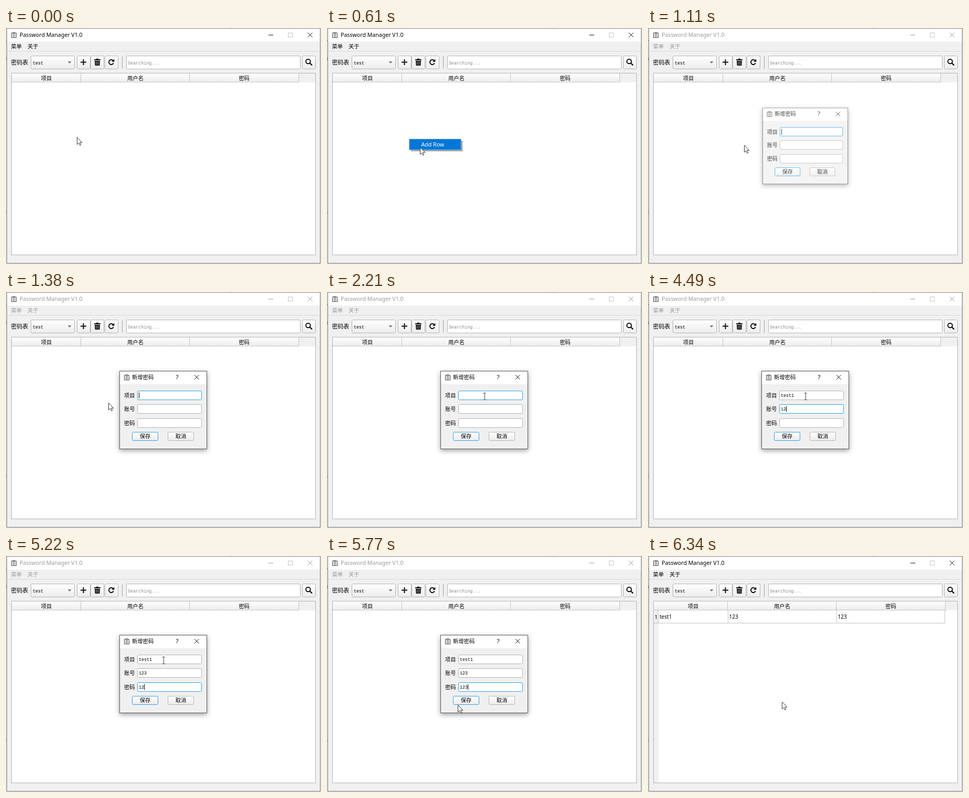
Write an HTML page that moves like this. It is 600 px wide and 452 px high and loops after 7.13 s.

```html
<!DOCTYPE html>
<html lang="zh">
<head>
<meta charset="utf-8">
<title>Password Manager</title>
<style>
html, body { margin: 0; width: 100%; height: 100%; overflow: hidden; background: #e4e4e4; }
svg { display: block; }
text { font: 10.3px "Noto Sans", "Noto Sans CJK SC", "Noto Sans CJK", sans-serif; fill: #000; white-space: pre; }
.mid { text-anchor: middle; }
.title { font-size: 10.6px; }
.mono { font: 8.4px "Liberation Mono", monospace; }
.box { fill: #fff; stroke: #b4b4b4; }
.btn { fill: url(#face); stroke: #b4b4b4; }
.focus { stroke: #30a0ea; }
.pressed { fill: #d6dde3; }
.line { fill: none; stroke: #c3c3c3; }
.ink { fill: none; stroke: #111; }
.inactive text { fill: #9a9a9a; }
.inactive .ink { stroke: #999; }
</style>
</head>
<body>
<svg width="600" height="452" viewBox="0 0 600 452">
  <defs>
    <linearGradient id="face" x2="0" y2="1">
      <stop stop-color="#fff"/><stop offset="1" stop-color="#ececec"/>
    </linearGradient>
    <filter id="shadow" x="-20%" y="-20%" width="140%" height="145%">
      <feDropShadow dx="0" dy="3" stdDeviation="5" flood-opacity=".38"/>
    </filter>
    <g id="clip" fill="none" stroke="#444">
      <path d="M2.5 1.5H.5v9h9v-9h-2M3 .5h4v2H3z"/>
      <path d="M2.5 4.5h5M2.5 6.5h5M2.5 8.5h5" stroke-width=".8"/>
    </g>
    <path id="cross" d="M0 0l8.5 8.5M8.5 0L0 8.5"/>
  </defs>

  <rect x="1.5" y=".5" width="597" height="450" fill="#f0f0f0" stroke="#7c7c7c"/>
  <path d="M0 24.5h1M0 56v6M0 353.5h1M428 .5h2" stroke="#555"/>
  <rect x="2" y="1" width="596" height="25" fill="#fff"/>
  <path d="M2 44.5h596" stroke="#d9d9d9"/>
  <use href="#clip" x="10" y="8"/>
  <g id="chrome">
    <text class="title" x="26" y="17">Password Manager V1.0</text>
    <text x="9.5" y="39">菜单</text>
    <text x="41" y="39">关于</text>
    <path class="ink" d="M500 13.5h9"/>
    <path d="M537.5 9.5h8v8h-8z" class="line"/>
    <use href="#cross" class="ink" x="575" y="9"/>
  </g>

  <text x="9.5" y="70" style="font-size:10.9px">密码表</text>
  <rect class="btn" x="47.5" y="53.5" width="83" height="25" rx="2"/>
  <text class="mono" x="51" y="69.5">test</text>
  <path d="M117.5 64h7l-3.5 4z" fill="#777"/>
  <g class="btn">
    <rect x="135.5" y="53.5" width="25" height="25" rx="2"/>
    <rect x="161.5" y="53.5" width="25" height="25" rx="2"/>
    <rect x="188.5" y="53.5" width="25" height="25" rx="2"/>
    <rect x="564.5" y="53.5" width="25" height="25" rx="2"/>
  </g>
  <g fill="none" stroke="#111" stroke-width="2">
    <path d="M142 65.5h11M147.5 60v11"/>
    <path d="M204 62.3A4.6 4.6 0 1 0 204.8 67.2"/>
    <circle cx="575.5" cy="64" r="4.3"/>
    <path d="M578.5 67l4.5 4.5" stroke-width="2.4"/>
  </g>
  <path d="M206.3 59.3v5.4h-5.4zM168 60h3.5l1-1.5h3l1 1.5h3.5v2h-12zM169 63h10l-.6 9h-8.8z" fill="#111"/>
  <path d="M171.7 64.5v6M174 64.5v6M176.3 64.5v6" stroke="#bbb" stroke-width=".8"/>
  <path d="M221.5 54v24" stroke="#a0a0a0"/>
  <rect class="box" x="229.5" y="53.5" width="331" height="25" rx="2"/>
  <text class="mono" x="232" y="69.5" style="fill:#888">Searching...</text>

  <rect class="box" x="10.5" y="86.5" width="579" height="348"/>
  <rect x="11" y="87" width="578" height="17" fill="#f0f0f0"/>
  <rect id="header" x="11" y="87" height="17" fill="url(#face)"/>
  <path id="rule" class="line"/>
  <g id="cols">
    <path class="line" d="M142.5 87v17M349.5 87v17M557.5 87v17"/>
    <text class="mid" x="77" y="99.5">项目</text>
    <text class="mid" x="246.5" y="99.5">用户名</text>
    <text class="mid" x="453.5" y="99.5">密码</text>
  </g>
  <g id="row">
    <rect x="11" y="104" width="9" height="330" fill="#f0f0f0"/>
    <path class="line" d="M11 128.5h555M19.5 104v24M152.5 104v24M359.5 104v24M565.5 104v24"/>
    <g style="font-size:10px">
      <text x="12.5" y="120.5">1</text>
      <text x="22" y="120" style="font-size:10px">test1</text>
      <text x="154.5" y="120" style="font-size:10px">123</text>
      <text x="361.5" y="120" style="font-size:10px">123</text>
    </g>
  </g>

  <g id="menu">
    <path d="M160 234h96v-18h2v20h-98z" fill="#000" opacity=".42"/>
    <rect id="item" x="156.5" y="212.5" width="99" height="21" stroke="#a9cbe6"/>
    <text id="label" class="title" x="179.5" y="227">Add Row</text>
  </g>

  <g id="dialog">
    <rect x="216.5" y="151.5" width="166" height="149" fill="#f0f0f0" stroke="#5c5c5c" filter="url(#shadow)"/>
    <rect x="217" y="152" width="165" height="24.5" fill="#fff"/>
    <use href="#clip" x="225" y="158"/>
    <text x="240" y="167">新增密码</text>
    <text class="mid" x="326" y="167" style="font-size:11.5px;font-weight:500">?</text>
    <use href="#cross" class="ink" x="359" y="159"/>
    <g id="fields"></g>
    <path id="caret" stroke="#000"/>
    <rect id="save" class="btn focus" x="240.5" y="268.5" width="49" height="16" rx="2"/>
    <text class="mid" x="265" y="280">保存</text>
    <rect class="btn" x="308.5" y="268.5" width="49" height="16" rx="2"/>
    <text class="mid" x="333" y="280">取消</text>
  </g>

  <path id="arrow" d="M.5 .5V14L3.6 11.2 5.8 15.8 7.8 14.9 5.7 10.4H9.8z" fill="#fff" stroke="#222" stroke-width=".9"/>
  <path id="beam" d="M-2.5 -6.5H2.5M.5 -6.5V6.5M-2.5 6.5H2.5" fill="none" stroke="#444"/>
</svg>
<script>
const LOOP = 7130, OPEN = 1030, CLOSE = 5980;
const $ = id => document.getElementById(id);
const clamp = v => Math.max(0, Math.min(1, v));
const show = (id, on) => $(id).style.display = on ? '' : 'none';

// Each field: top edge, time it gains focus, and the time of every keystroke.
const fields = [
  { label: '项目', y: 189, focus: 0, text: 'test1', keys: [2740, 3000, 3150, 3220, 3480] },
  { label: '账号', y: 215, focus: 3750, text: '123', keys: [4160, 4490, 4690] },
  { label: '密码', y: 242, focus: 4890, text: '123', keys: [5220, 5220, 5420] }
];
$('fields').innerHTML = fields.map(f => `
  <text x="225" y="${f.y + 13}">${f.label}</text>
  <rect class="box" x="250.5" y="${f.y + .5}" width="122" height="17" rx="2"/>
  <text class="mono" x="253" y="${f.y + 12}"></text>`).join('');
const boxes = $('fields').querySelectorAll('rect');
const values = $('fields').querySelectorAll('.mono');

// Pointer path: time, x, y
const path = [
  [130, 135, 209], [340, 156, 212], [470, 156, 212], [610, 177, 228], [680, 177, 228],
  [820, 180, 227], [1030, 180, 227], [1380, 195, 212], [1450, 195, 212], [1660, 256, 211],
  [2210, 300, 200], [5350, 300, 200], [5770, 249, 285], [5980, 249, 285], [6340, 255, 279]
];

function pointer(t) {
  const i = path.findIndex(p => p[0] > t);
  if (i < 0) return path[path.length - 1].slice(1);
  if (!i) return path[0].slice(1);
  const [t0, x0, y0] = path[i - 1], [t1, x1, y1] = path[i];
  const k = (t - t0) / (t1 - t0);
  return [x0 + (x1 - x0) * k, y0 + (y1 - y0) * k].map(Math.round);
}

function drawTable(filled) {
  const right = filled ? 566 : 557;
  $('header').setAttribute('width', right - 11);
  $('rule').setAttribute('d', `M11 103.5H${right}`);
  $('cols').setAttribute('transform', `translate(${filled ? 9 : 0})`);
  show('row', filled);
}

function drawMenu(t, x) {
  show('menu', t >= 410 && t < 890);
  const hot = x > 157;
  $('item').style.fill = hot ? '#0078d7' : '#f2f2f2';
  $('label').style.fill = hot ? '#fff' : '#000';
}

function drawDialog(t) {
  const seen = Math.min(clamp((t - OPEN + 70) / 210), clamp(1 - (t - CLOSE + 70) / 210));
  const scale = .92 + .08 * seen;
  show('dialog', seen > 0);
  $('dialog').setAttribute('opacity', seen);
  $('dialog').setAttribute('transform', `translate(299.5 226) scale(${scale}) translate(-299.5 -226)`);
  const active = fields.filter(f => t >= f.focus).length - 1;
  fields.forEach((f, i) => {
    const count = f.keys.filter(k => t >= k).length;
    values[i].textContent = f.text.slice(0, count);
    boxes[i].classList.toggle('focus', i === active);
    if (i === active) $('caret').setAttribute('d', `M${253.5 + count * 5.04} ${f.y + 3.5}v11`);
  });
  show('caret', t < 1940 || t >= 2470);
  $('save').classList.toggle('pressed', t >= 5840 && t < 5910);
}

function frame() {
  const t = performance.now() % LOOP;
  const [x, y] = pointer(t);
  const modal = t >= OPEN - 70 && t < CLOSE;
  $('chrome').classList.toggle('inactive', modal);
  drawTable(t >= CLOSE);
  drawMenu(t, x);
  drawDialog(t);
  const typing = modal && x > 250 && x < 373 && fields.some(f => y >= f.y && y < f.y + 18);
  show('arrow', !typing);
  show('beam', typing);
  $(typing ? 'beam' : 'arrow').setAttribute('transform', `translate(${x} ${y})`);
  requestAnimationFrame(frame);
}
frame();
</script>
</body>
</html>
```
